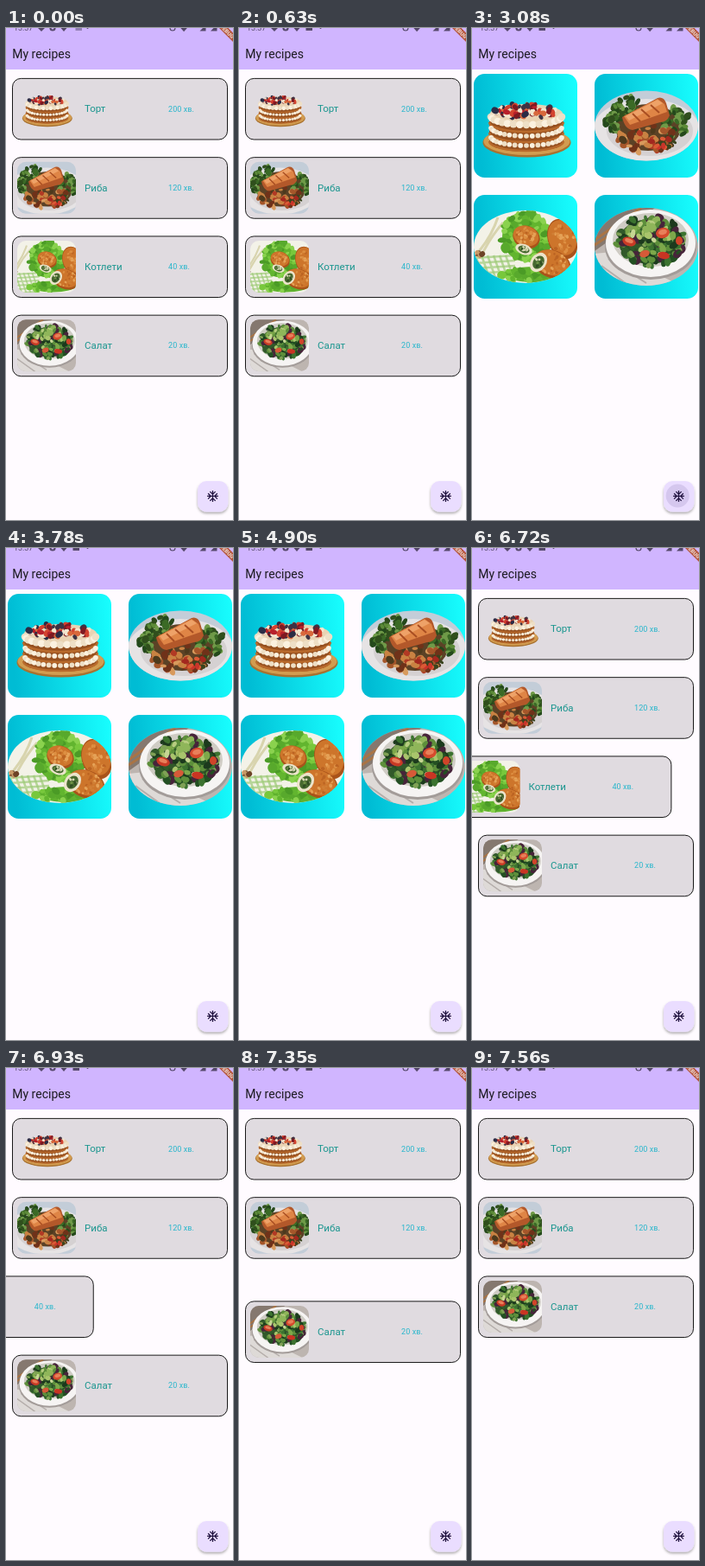
Recreate the animation shown at these times as an HTML page. Size 263 by 569 pixels, loop 8000 ms.

```html
<!DOCTYPE html>
<html lang="uk">
<head>
<meta charset="utf-8">
<title>My recipes</title>
<style>
  html, body { margin: 0; width: 100%; height: 100%; overflow: hidden; background: #fffbff; }
  svg { display: block; width: 100vw; height: 100vh; }
  text { font-family: Roboto, sans-serif; }
  .title { font-size: 11.5px; fill: #1b968f; }
  .mins { font-size: 9px; letter-spacing: .1px; fill: #28b6cc; }
</style>
</head>
<body>
<svg id="stage" viewBox="0 0 263 569" xmlns="http://www.w3.org/2000/svg"></svg>
<script>
const LOOP = 8000, STEP = 70, PITCH = 91.25;

function random(seed) {
  return () => (seed = (seed * 16807) % 2147483647) / 2147483647;
}

const ellipse = (x, y, rx, ry, fill, turn = 0) =>
  `<ellipse cx="${x.toFixed(1)}" cy="${y.toFixed(1)}" rx="${rx.toFixed(1)}" ry="${ry.toFixed(1)}" fill="${fill}"` +
  (turn ? ` transform="rotate(${turn.toFixed(0)} ${x.toFixed(1)} ${y.toFixed(1)})"` : '') + '/>';
const path = (d, fill, extra = '') => `<path d="${d}" fill="${fill}" ${extra}/>`;
const rect = (x, y, w, h, fill, r = 0, extra = '') =>
  `<rect x="${x}" y="${y}" width="${w}" height="${h}" rx="${r}" fill="${fill}" ${extra}/>`;

// Scatter small ellipses inside a larger one.
function scatter(seed, n, cx, cy, rx, ry, size, colors) {
  const rnd = random(seed);
  rnd();
  let out = '';
  for (let i = 0; i < n; i++) {
    const a = rnd() * 2 * Math.PI, d = Math.sqrt(rnd()), s = size * (0.65 + rnd() * 0.6);
    out += ellipse(cx + rx * d * Math.cos(a), cy + ry * d * Math.sin(a), s, s * (0.5 + rnd() * 0.4),
      colors[Math.floor(rnd() * colors.length)], rnd() * 180);
  }
  return out;
}

function cake() {
  const beads = (y, size, n) => {
    let row = '';
    for (let i = -n; i <= n; i++) {
      const a = i / n * 1.5;
      row += ellipse(1 + 41 * Math.sin(a), y + 10 * Math.cos(a), size, size * 0.95, i % 2 ? '#fbf1df' : '#eedfc6');
    }
    return row;
  };
  return ellipse(1.5, 19.5, 51, 17, '#a87230') + ellipse(1.5, 18, 50, 16, '#d29c50') +
    path('M-42 -12v31a43 11 0 0 0 86 0v-31z', '#96501f') +
    path('M-42 -4a43 11 0 0 0 86 0M-42 8a43 11 0 0 0 86 0M-42 18a43 11 0 0 0 86 0', 'none', 'stroke="#b96a2c" stroke-width="2.5"') +
    beads(13, 2.9, 9) + beads(2, 2.9, 9) +
    ellipse(1, -14, 42, 11, '#e9d3b3') +
    scatter(23, 75, 1, -17, 37, 8, 3.6, ['#b8202a', '#d3432f', '#2b2c45', '#7d1a22', '#3e3344', '#d8683c', '#f3e6cf']) +
    beads(-11, 4.4, 8);
}

function fish() {
  const broccoli = ['#24491b', '#3b6a26', '#304f1d', '#5c8a38', '#6f9a48'];
  return rect(-60, -41, 120, 82, '#c3cdd8') +
    ellipse(0, 5, 62, 36, '#e6e3e4') + ellipse(4, 6, 50, 29, '#d5d1d2') +
    ellipse(2, 2, 38, 27, '#5b4226') +
    scatter(5, 50, -22, -20, 17, 13, 4.2, broccoli) +
    scatter(9, 32, -39, -3, 10, 11, 4, broccoli) +
    scatter(14, 42, 34, -3, 16, 17, 4.4, broccoli) +
    scatter(31, 55, 0, 15, 33, 16, 4.6, ['#c98242', '#a5562a', '#d89a5c', '#6f3219', '#b23a24', '#4d3a1d']) +
    scatter(44, 14, 17, 19, 18, 8, 4.2, ['#c9352a', '#a3281f', '#dc5a35', '#39431e']) +
    path('M-28 -10L13 -32Q20 -34 23 -26L27 -12Q24 -4 16 -4L-16 5Q-25 4 -28 -10z', '#b3582a') +
    path('M-26 -11L13 -31L21 -25L24 -16L-19 -1z', '#df8546') +
    path('M-24 -11L13 -30L19 -26L-20 -6z', '#eea268') +
    path('M-16 -14l9 9M-6 -19l10 9M5 -24l10 9', 'none', 'stroke="#a94e22" stroke-width="2"');
}

function cutlets() {
  const greens = ['#62b52f', '#78c83c', '#4b9b26', '#8ad24e', '#58a92c'];
  let out = rect(-60, -42, 120, 84, '#f3f2e8');
  for (let i = 0; i < 6; i++) {
    out += path(`M${-58 + i * 7} 10l12 34M-60 ${13 + i * 6}l48 -3`, 'none', 'stroke="#9fcb78" stroke-width="2.6" opacity=".7"');
  }
  out += path('M-58 10Q-40 -10 -32 -34M-50 8Q-40 -12 -26 -28', 'none', 'stroke="#d8d4ae" stroke-width="3"') +
    scatter(8, 7, -54, 7, 4, 5, 3, ['#8a5a3a', '#c99a68', '#6d4327']) +
    ellipse(0, -12, 27, 29, '#62b52f') + ellipse(10, 32, 36, 9, '#5fb12e') +
    scatter(17, 110, 0, -12, 28, 29, 5, greens) + scatter(19, 36, 8, 32, 36, 8, 4.5, greens);
  const cutlet = (x, y, rx, ry, turn) => ellipse(x, y, rx, ry, '#a9531a', turn) +
    ellipse(x - 0.5, y - 1.5, rx * 0.94, ry * 0.88, '#cd752b', turn) +
    scatter(x + 60, 34, x, y - 1, rx * 0.75, ry * 0.75, 2, ['#dd8f42', '#bb6322', '#d07f35', '#e5a257']);
  const cut = (x, y, rx, ry, turn) => ellipse(x, y, rx, ry, '#ece4cb', turn) +
    ellipse(x, y, rx * 0.68, ry * 0.68, '#47692f', turn) +
    scatter(x + 90, 7, x, y, rx * 0.5, ry * 0.5, 2, ['#6d9145', '#2f4d22', '#d8d9b4']);
  return out + cutlet(43, -9, 17, 24, -20) + cutlet(1, -11, 16, 13, 20) + cut(-2, 3, 10, 6, 20) +
    cutlet(31, 20, 22, 16, 20) + cut(15, 18, 9, 12, 35);
}

function salad() {
  return rect(-60, -45, 120, 90, '#bdb5b0') +
    path('M-60 -45H10L-60 5z', '#85786f') + path('M-60 -8L-6 -45M-60 -2L-20 -28', 'none', 'stroke="#a97445" stroke-width="3"') +
    path('M-60 8L-40 6L40 45H-60z', '#dedad7') +
    path('M-52 22L-20 45M-44 14L0 42', 'none', 'stroke="#b5aeab" stroke-width="2"') +
    ellipse(5, 0, 53, 38, '#a39c99') + ellipse(5, -4, 52, 39, '#f6f4f3') + ellipse(5, -8, 44, 31, '#cfccc4') +
    ellipse(4, -6, 36, 26, '#2c4b26') +
    scatter(12, 170, 4, -7, 39, 29, 5, ['#234f22', '#3c7330', '#5d8f3b', '#1c3a1d', '#31592a', '#47243a', '#7fa155']) +
    scatter(28, 22, 4, -8, 32, 22, 4.2, ['#a9c56c', '#c6d693', '#7da84a']) +
    scatter(37, 10, 2, -26, 14, 6, 4.5, ['#8fb65a', '#5d8f3b', '#b7cd80']) +
    ellipse(-20, -6, 8, 5, '#c93a25', 20) + ellipse(19, -16, 8, 6, '#d64a2d', -15) +
    ellipse(20, 10, 7, 4, '#c93523', 10) + ellipse(-2, 8, 6, 4, '#d65a38', -20) +
    ellipse(38, -7, 4, 5, '#d04429') + ellipse(-20, -7, 5, 2.5, '#e8805a', 20) + ellipse(19, -17, 5, 3, '#e8805a', -15);
}

const dishes = [
  { id: 'cake', name: 'Торт', mins: 200, art: cake, half: 60, scale: 0.567 },
  { id: 'fish', name: 'Риба', mins: 120, art: fish, half: 40.5, scale: 0.75 },
  { id: 'cutlets', name: 'Котлети', mins: 40, art: cutlets, half: 42, scale: 0.72 },
  { id: 'salad', name: 'Салат', mins: 20, art: salad, half: 45, scale: 0.67 },
];

const defs = `<defs>
  <linearGradient id="cyan" x1="0" y1=".1" x2="1" y2="0"><stop stop-color="#00bcd4"/><stop offset="1" stop-color="#18ffff"/></linearGradient>
  <filter id="shade" x="-50%" y="-50%" width="200%" height="200%"><feDropShadow dx="0" dy="2" stdDeviation="1.8" flood-opacity=".32"/></filter>
  <clipPath id="thumb"><rect x="-34" y="-30" width="68" height="60" rx="10"/></clipPath>
  <clipPath id="fabClip"><rect x="222" y="524" width="35.4" height="35.4" rx="10.2"/></clipPath>
  ${dishes.map(d => `<g id="${d.id}">${d.art()}</g>
  <clipPath id="oval-${d.id}"><ellipse rx="60" ry="${d.half}"/></clipPath>`).join('')}
</defs>`;

const row = (d, i) => `<g id="row${i}">
  ${rect(7.5, 0.4, 249, 70.6, '#e0dbe0', 9.8, 'stroke="#000" stroke-width=".9"')}
  <g transform="translate(47 35.5)" clip-path="url(#thumb)"><use href="#${d.id}" transform="scale(${d.scale})"/></g>
  <text class="title" x="91" y="39.4">${d.name}</text>
  <text class="mins" x="188" y="38.7">${d.mins} хв.</text>
</g>`;

const tile = (d, i) => `<g transform="translate(${62 + 140 * (i % 2)} ${113 + 140 * (i >> 1)})">
  ${rect(-60, -60, 120, 120, 'url(#cyan)', 12.5)}
  <g clip-path="url(#oval-${d.id})"><use href="#${d.id}"/></g>
</g>`;

const ink = '#55486a';
const statusBar = `<g fill="${ink}">
  <text x="9" y="3.4" font-size="9">13:37</text>
  <path d="M37 0h8l-4 4z"/><circle cx="54" cy="0" r="3.6"/><circle cx="54" cy="0" r="1.5" fill="#d0b5ff"/>
  <path d="M63.5 0h7l-3.5 4z"/>
  <g id="note"><path d="M77.5 0h7.5v3h-7.5z"/></g><circle cx="94.5" cy="0" r="1"/>
  <circle cx="193" cy="0" r="3" fill="none" stroke="${ink}" stroke-width="1.1"/>
  <path d="M202.3 0h7.6l-3.8 4.3z"/><path d="M224.5 3.5l4-4h3v4z"/><path d="M237 3.5l4-4h3.5v4z"/>
</g>`;

const snowflake = 'M22 11h-4.17l3.24-3.24-1.41-1.42L15 11h-2V9l4.66-4.66-1.42-1.41L13 6.17V2h-2v4.17' +
  'L7.76 2.93 6.34 4.34 11 9v2H9L4.34 6.34 2.93 7.76 6.17 11H2v2h4.17l-3.24 3.24 1.41 1.42L9 13h2v2' +
  'l-4.66 4.66 1.42 1.41L11 17.83V22h2v-4.17l3.24 3.24 1.42-1.41L13 15v-2h2l4.66 4.66 1.41-1.42L17.83 13H22z';

document.getElementById('stage').innerHTML = defs + rect(0, 0, 263, 569, '#fffbff') +
  `<g id="list">${dishes.map(row).join('')}</g>
  <g id="grid">${dishes.map(tile).join('')}</g>
  ${rect(0, 0, 263, 48, '#d0b5ff')}
  ${statusBar}
  <text x="7.3" y="35" font-size="14" fill="#1d1b20">My recipes</text>
  <path d="M247 0h10.5l5.5 5.5v10.5z" fill="#b4553a"/>
  <text transform="translate(256 4) rotate(45)" y="2.2" font-size="6.2" font-weight="900" text-anchor="middle" fill="#fff" opacity=".75">DEBUG</text>
  ${rect(222, 524, 35.4, 35.4, '#eaddff', 10.2, 'filter="url(#shade)"')}
  <g clip-path="url(#fabClip)"><circle id="ripple" cx="238.2" cy="541" fill="#21005d"/></g>
  <path d="${snowflake}" fill="#21133f" transform="translate(231.8 533.8) scale(.64)"/>`;

const el = id => document.getElementById(id);
const part = (t, from, to) => Math.min(1, Math.max(0, (t - from) / (to - from)));
const place = (i, x, y) => el('row' + i).setAttribute('transform', `translate(${x.toFixed(2)} ${y.toFixed(2)})`);

// Cubic ease (.25, .1, .25, 1), solved by bisection.
function ease(u) {
  const curve = (a, b, s) => 3 * a * s * (1 - s) ** 2 + 3 * b * s * s * (1 - s) + s ** 3;
  let lo = 0, hi = 1;
  for (let i = 0; i < 20; i++) {
    const mid = (lo + hi) / 2;
    if (curve(0.25, 0.25, mid) < u) lo = mid; else hi = mid;
  }
  return curve(0.1, 1, hi);
}

const taps = [
  { at: 3080, hold: 3290, end: 3570 },
  { at: 4970, hold: 5250, end: 5670 },
];

function render(time) {
  const t = Math.floor(time / STEP) * STEP;
  const grid = t >= taps[0].at && t < taps[1].at;
  el('grid').style.display = grid ? '' : 'none';
  el('list').style.display = grid ? 'none' : '';

  const note = part(t, 210, 420);
  el('note').setAttribute('transform', `translate(${(3 * (1 - note)).toFixed(2)} 0)`);
  el('note').setAttribute('opacity', 0.5 + 0.5 * note);

  const swipe = part(t, 6650, 7070) ** 1.3;
  const fold = ease(part(t, 7210, 7560));
  dishes.forEach((d, i) => place(i, i === 2 ? -263 * swipe : 0, 58 + PITCH * (i - (i === 3 ? fold : 0))));

  const tap = taps.find(p => t >= p.at && t < p.end);
  el('ripple').setAttribute('r', tap ? 13.5 + 13 * part(t, tap.at, tap.at + 140) : 0);
  el('ripple').setAttribute('opacity', tap ? 0.1 * (1 - part(t, tap.hold, tap.end)) : 0);
}

const start = performance.now();
function tick() {
  render((performance.now() - start) % LOOP);
  requestAnimationFrame(tick);
}
tick();
</script>
</body>
</html>
```
